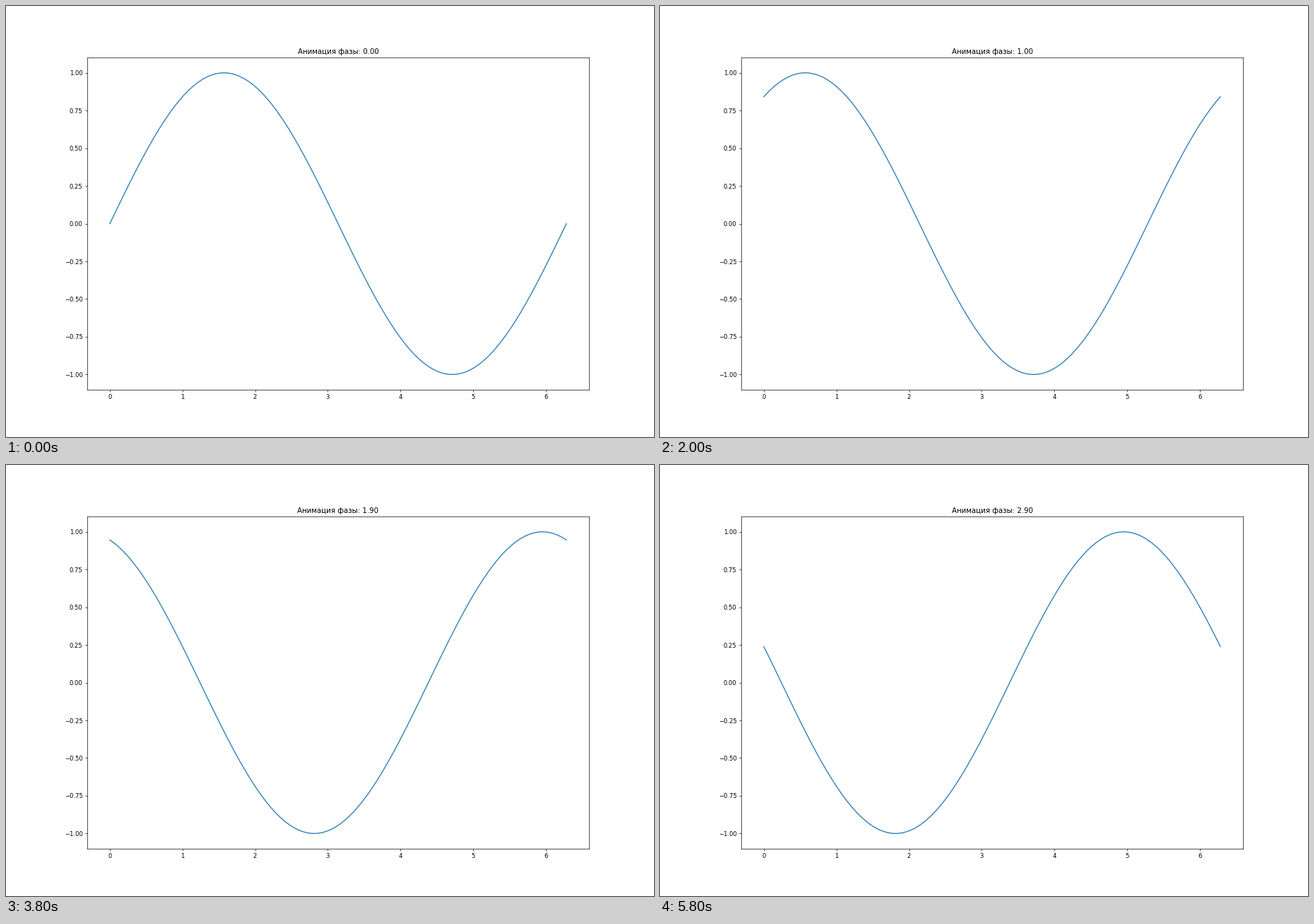
Write a matplotlib script that moves like this. It is 917 by 611 pixels and loops after 6000 ms.

```python
import numpy as np
import matplotlib.pyplot as plt
from matplotlib.animation import FuncAnimation

WIDTH, HEIGHT = 917, 611
DPI = WIDTH / 15
EPS = 1e-6  # keeps the pixel size from rounding down
FRAMES, INTERVAL = 30, 200
PHASE_STEP = 0.1

plt.rcParams["font.family"] = "DejaVu Sans"

fig, ax = plt.subplots(
    figsize=((WIDTH + EPS) / DPI, (HEIGHT + EPS) / DPI), dpi=DPI
)
x = np.linspace(0, 2 * np.pi, 100)
line, = ax.plot(x, np.sin(x))
ax.set_ylim(-1.1, 1.1)
title = ax.set_title("")


def update(frame):
    phase = frame * PHASE_STEP
    line.set_ydata(np.sin(x + phase))
    title.set_text(f"Анимация фазы: {phase:.2f}")
    return line, title


anim = FuncAnimation(
    fig, update, frames=FRAMES, interval=INTERVAL, repeat=True, repeat_delay=0
)
plt.show()
```
